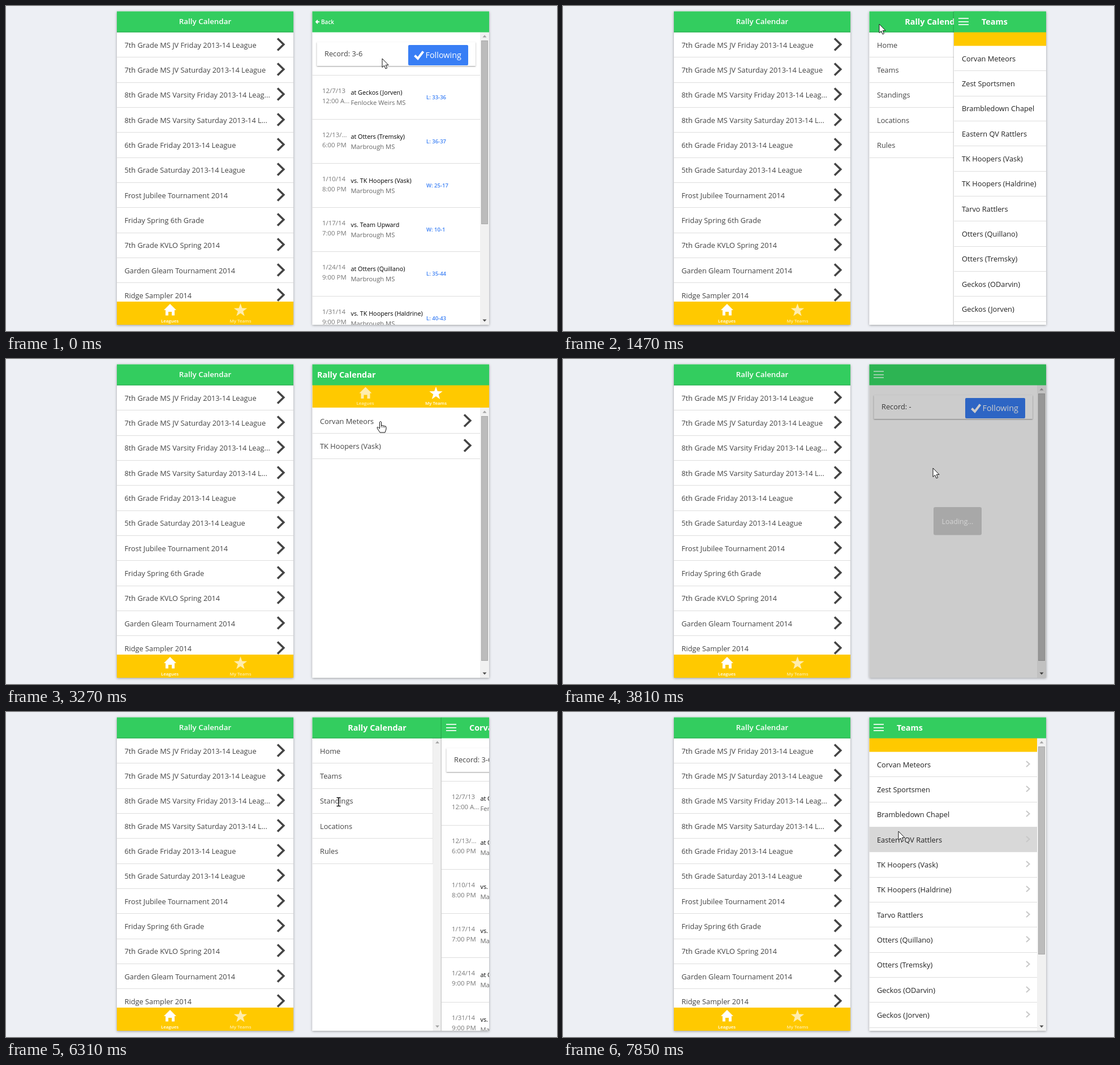
An HTML page that plays this animation: 974x575 px, repeating every 8 s.

```html
<!DOCTYPE html>
<html lang="en">
<head>
<meta charset="utf-8">
<title>League schedule app</title>
<style>
  html, body { margin: 0; width: 100%; height: 100%; overflow: hidden; background: #edeff4; }
  svg { display: block; position: absolute; left: 0; top: 0; }
  text { font-family: "Open Sans", "Noto Sans", sans-serif; font-size: 12.8px; fill: #444; }
  .panel { fill: #fff; filter: drop-shadow(0 1px 2px rgba(0, 0, 0, .35)); }
  .title { font-size: 14.4px; font-weight: 700; fill: #fff; }
  .tab { font-size: 7.9px; font-weight: 600; fill: #fff; text-anchor: middle; }
  .date { font-size: 11.4px; fill: #777; }
  .rival { font-size: 10.8px; fill: #000; }
  .place { font-size: 11.2px; fill: #666; }
  .score { font-size: 9.5px; font-weight: 600; fill: #387ef5; }
</style>
</head>
<body>
<svg id="stage" width="974" height="575" viewBox="0 0 974 575"></svg>
<script>
const GREEN = '#33cd5f', YELLOW = '#ffc900', BLUE = '#387ef5', LINE = '#ddd';
const PITCH = 44.34, LOOP = 8000, PAGE_W = 313;

const leagues = [
  '7th Grade MS JV Friday 2013-14 League', '7th Grade MS JV Saturday 2013-14 League',
  '8th Grade MS Varsity Friday 2013-14 League', '8th Grade MS Varsity Saturday 2013-14 League',
  '6th Grade Friday 2013-14 League', '5th Grade Saturday 2013-14 League',
  'Frost Jubilee Tournament 2014', 'Friday Spring 6th Grade', '7th Grade KVLO Spring 2014',
  'Garden Gleam Tournament 2014', 'Ridge Sampler 2014'
];
const teams = [
  'Corvan Meteors', 'Zest Sportsmen', 'Brambledown Chapel', 'Eastern QV Rattlers',
  'TK Hoopers (Vask)', 'TK Hoopers (Haldrine)', 'Tarvo Rattlers', 'Otters (Quillano)',
  'Otters (Tremsky)', 'Geckos (ODarvin)', 'Geckos (Jorven)'
];
const games = [
  ['12/7/13', '12:00 A...', 'at Geckos (Jorven)', 'Fenlocke Weirs MS', 'L: 33-36'],
  ['12/13/...', '6:00 PM', 'at Otters (Tremsky)', 'Marbrough MS', 'L: 36-37'],
  ['1/10/14', '8:00 PM', 'vs. TK Hoopers (Vask)', 'Marbrough MS', 'W: 25-17'],
  ['1/17/14', '7:00 PM', 'vs. Team Upward', 'Marbrough MS', 'W: 10-1'],
  ['1/24/14', '9:00 PM', 'at Otters (Quillano)', 'Marbrough MS', 'L: 35-44'],
  ['1/31/14', '9:00 PM', 'vs. TK Hoopers (Haldrine)', 'Marbrough MS', 'L: 40-43']
];
const appName = 'Rally Calendar';

// Drawing helpers, all returning SVG markup
const rect = (x, y, w, h, fill, more = '') =>
  `<rect x="${x}" y="${y}" width="${w}" height="${h}" fill="${fill}" ${more}/>`;
const text = (x, y, s, cls = '', more = '') => `<text x="${x}" y="${y}" class="${cls}" ${more}>${s}</text>`;
const path = (d, more) => `<path d="${d}" ${more}/>`;
const group = (id, body, more = '') => `<g id="${id}" ${more}>${body}</g>`;
const stroke = (color, w) => `fill="none" stroke="${color}" stroke-width="${w}"`;
const shorten = (list, cuts) => list.map((s, i) => cuts[i] ? s.slice(0, -cuts[i]) + '...' : s);

const bigArrow = (x, y) => path(`M${x} ${y - 10.5}l10.8 10.5l-10.8 10.5`, stroke('#444', 3.6));
const smallArrow = (x, y) => path(`M${x} ${y - 5}l5.5 5l-5.5 5`, stroke('#c8c8c8', 2));

function rows(names, left, right, top, arrow, color = '#444') {
  return names.map((name, i) => {
    const y = top + Math.floor(PITCH * i);
    return rect(left, Math.round(top + PITCH * (i + 1)), right - left, 1, LINE) +
      text(left + 13.5, y + 28, name, '', `style="fill:${color}"`) +
      (arrow ? arrow(y + 22) : '');
  }).join('');
}

function scrollbar(x, top, thumbEnd) {
  const thumb = thumbEnd
    ? rect(x + 2.5, top + 15.5, 11, thumbEnd - top - 16, '#bcbcbc', 'stroke="#a8a8a8"') : '';
  const down = thumbEnd ? '#505050' : '#a3a3a3';
  return rect(x, top, 16, 564 - top, '#f1f1f1') + thumb +
    path(`M${x + 4.5} ${top + 9.5}h7l-3.5 -4z`, 'fill="#a3a3a3"') +
    path(`M${x + 4.5} 554.5h7l-3.5 4z`, `fill="${down}"`);
}

function star(cx, cy, r) {
  const pts = Array.from({ length: 10 }, (_, i) => {
    const a = Math.PI * (i / 5 - .5), d = i % 2 ? r * .4 : r;
    return `${(cx + d * Math.cos(a)).toFixed(2)},${(cy + d * Math.sin(a)).toFixed(2)}`;
  });
  return `<polygon points="${pts.join(' ')}" fill="#fff"/>`;
}

function tabs(active, width, height, labelY) {
  const fade = i => `opacity="${i === active ? 1 : .68}"`;
  return rect(196, 523, width, height, YELLOW) +
    `<g ${fade(0)}>` +
    path('M290 527L301 538H298V547.5H293V541H287V547.5H282V538H279Z', 'fill="#fff"') +
    text(289.5, labelY, 'Leagues', 'tab') + `</g><g ${fade(1)}>` +
    star(414.5, 538.6, 12.3) + text(414.5, labelY, 'My Teams', 'tab') + '</g>';
}
const topTabs = active => `<g transform="translate(345.5 -477.5)">${tabs(active, 313, 40.5, 558.5)}</g>`;

const burger = [21, 27, 32].map(y => rect(549, y, 18, 1.7, '#fff')).join('');
const header = (x, w) => rect(x, 9.5, w, 37, GREEN);
const darkEdge = (x, w) => rect(x, 45.5, w, 1, '#28a54c');
const paper = rect(541, 46, PAGE_W, 518, '#fff');

function detail() {
  const list = games.map(([day, hour, rival, place, score], i) => {
    const y = Math.round(78.1 * i);
    return rect(541, 122 + y, 297, 1, LINE) +
      text(559, 154 + y, day, 'date') + text(559, 172 + y, hour, 'date') +
      text(609.5, 157 + y, rival, 'rival') + text(609.5, 175 + y, place, 'place') +
      text(743, 165 + y, score, 'score');
  }).join('');
  return paper +
    rect(549.5, 64, 280.5, 42, '#fff', 'style="filter:drop-shadow(0 1px 1.2px rgba(0,0,0,.4))"') +
    rect(711, 69, 106, 36, BLUE, 'rx="2"') +
    path('M722.5 87.5l5.5 5.5l9.5 -12.5', stroke('#fff', 4)) +
    text(741.5, 92, 'Following', '', 'style="font-size:14.4px;fill:#fff"') +
    group('loaded', text(563, 89, 'Record: 3-6') + list + scrollbar(838, 46, 386)) +
    group('blank', text(563, 89, 'Record: -') + scrollbar(838, 46, 534));
}

const pages = {
  home: paper + rows(shorten(leagues, { 1: 3, 2: 5, 3: 7 }), 541.5, 838, 87, y => bigArrow(810, y)) +
    scrollbar(838, 86, 240) + topTabs(0),
  mine: paper + rows([teams[0], teams[4]], 541.5, 838, 87, y => bigArrow(810, y)) +
    scrollbar(838, 86, 534) + topTabs(1),
  teams: paper + rect(541, 46, 297, 24.5, YELLOW) + rect(541, 203, 297, 44, '#d8d8d8', 'id="hover"') +
    rows(teams, 541.5, 838, 70, y => smallArrow(819, y), '#222') + scrollbar(838, 46, 429),
  detail: detail()
};
const heads = {
  back: path('M554 28h-6m3 -3l-3 3l3 3', stroke('#fff', 1.8)) +
    text(557, 32, 'Back', '', 'style="font-size:10px;font-weight:600;fill:#fff"'),
  home: text(550, 33, appName, 'title'),
  teams: burger + text(590, 33, 'Teams', 'title'),
  wait: `<g opacity=".7">${burger}</g>`,
  team: burger + text(590, 33, teams[0], 'title')
};
const cursors = {
  arrow: path('M0 0V15.5L3.6 12.3L6 18L8.6 16.9L6.2 11.4H11Z', 'fill="#fff" stroke="#111"'),
  hand: path('M-1.5 1.5Q0 -1 1.5 1.5V8Q3 6.5 4.5 8.3Q6 7 7.3 9Q9.5 8 10 10.5V14L8 20H-1L-5.5 13Q-7 10 -4.5 10.5L-1.5 13Z',
    'fill="#fff" stroke="#111"') + path('M1.5 8v3M4.5 8.5v3M7.3 9.2v2.5', stroke('#111', .8)),
  beam: path('M-3.5 -7.5H-1Q0 -7.5 0 -6.5Q0 -7.5 1 -7.5H3.5M0 -7V7M-3.5 7.5H-1Q0 7.5 0 6.5Q0 7.5 1 7.5H3.5', stroke('#111', 1.4))
};
const each = (prefix, set) => Object.entries(set).map(([k, v]) => group(`${prefix}-${k}`, v)).join('');

const stage = document.getElementById('stage');
stage.innerHTML =
  '<clipPath id="left"><rect x="196" y="46" width="312" height="478"/></clipPath>' +
  '<clipPath id="right"><rect x="541.5" y="9" width="312.5" height="555"/></clipPath>' +
  rect(196, 9.5, 312, 554.5, '#fff', 'class="panel"') + rect(541.5, 9.5, 312.5, 554.5, '#fff', 'class="panel"') +
  `<g clip-path="url(#left)">${rows(shorten(leagues, { 2: 2, 3: 5 }), 196, 508, 46, y => bigArrow(480, y))}</g>` +
  header(196, 312) + darkEdge(196, 312) +
  text(352, 32, appName, '', 'text-anchor="middle" style="font-size:13.4px;font-weight:600;fill:#fff"') +
  tabs(0, 312, 41, 560) +
  '<g clip-path="url(#right)">' +
  group('menu', rect(541, 9.5, 229, 555, '#fff') +
    rows(['Home', 'Teams', 'Standings', 'Locations', 'Rules'], 541.5, 755, 46) +
    rect(754, 46, 1, 222, LINE) + scrollbar(754.5, 46) +
    header(541, 229) + darkEdge(541, 229) +
    text(656, 33, appName, 'title', 'text-anchor="middle"')) +
  group('front', rect(539.5, 9.5, 2, 555, 'rgba(0,0,0,.15)') +
    each('page', pages) + header(541, PAGE_W) + each('head', heads)) +
  group('dim', rect(541, 9.5, PAGE_W, 37, 'rgba(0,0,0,.12)') + rect(541, 46.5, PAGE_W, 517.5, 'rgba(0,0,0,.2)')) +
  rect(655, 262, 85, 49.5, 'rgba(0,0,0,.7)', 'id="box" rx="3"') +
  text(697.5, 292, 'Loading...', '', 'id="note" text-anchor="middle" style="font-size:12.4px;fill:#fff"') +
  '</g>' + group('cursor', each('cur', cursors));

// Timeline
const ticks = [
  0, 150, 280, 400, 530, 660, 780, 930, 1080, 1200, 1350, 1470, 1620, 1740, 1890, 2010, 2160,
  2310, 2460, 2580, 2730, 2850, 3000, 3120, 3270, 3420, 3540, 3690, 3810, 3930, 4060, 4180, 4310, 4440,
  4570, 4720, 4840, 4990, 5140, 5260, 5400, 5540, 5680, 5800, 5940, 6060, 6190, 6310, 6460, 6610,
  6760, 6880, 7030, 7150, 7290, 7420, 7560, 7700, 7850
];
const pageSteps = [[0, 'detail'], [530, 'teams'], [1740, 'home'], [2460, 'mine'], [3540, 'detail'], [6880, 'teams']];
const headSteps = [[0, 'back'], [530, 'teams'], [1740, 'home'], [3540, 'wait'], [4310, 'team'], [6880, 'teams']];
const cursorSteps = [
  [0, 'arrow', 665, 93], [400, 'hand', 565, 27], [660, 'arrow', 570, 45], [780, 'arrow', 579, 65],
  [930, 'arrow', 575, 58], [1080, 'hand', 558, 30], [1470, 'arrow', 559, 32], [1740, 'beam', 586, 70],
  [1890, 'arrow', 592, 72], [2160, 'hand', 700, 82], [2460, 'hand', 757, 66], [2730, 'hand', 757, 66],
  [3270, 'hand', 662, 110], [3540, 'hand', 662, 110], [3690, 'arrow', 656, 160], [3810, 'arrow', 654, 193],
  [4310, 'arrow', 642, 180], [4840, 'hand', 557, 32], [4990, 'hand', 556, 32], [5140, 'hand', 556, 32],
  [5260, 'arrow', 562, 38], [5540, 'beam', 588, 62], [5800, 'arrow', 588, 88], [6060, 'beam', 588, 113],
  [6190, 'arrow', 588, 136], [6310, 'beam', 588, 159], [6460, 'arrow', 589, 132], [6610, 'beam', 590, 113],
  [7030, 'arrow', 590, 113], [7290, 'arrow', 590, 130], [7700, 'arrow', 593, 211]
];
const slideTrack = [[400, 0], [530, .62], [660, .92], [780, .995], [930, 1]];
const menuTrack = [
  [1350, 0], [1470, 150], [1620, 229], [1740, 229], [1890, 60], [2010, 0],
  [5140, 0], [5260, 140], [5400, 222], [5540, 229], [6760, 229], [6880, 120], [7030, 10], [7150, 0]
];
const dimTrack = [[3540, 0], [3690, .6], [3810, 1], [4180, 1], [4310, 0], [6880, 0], [7030, 1], [7290, 1], [7420, 0]];
const boxTrack = [[3690, 0], [3810, .25], [3930, 1], [4180, 1], [4310, 0], [6880, 0], [7030, .25], [7150, 1], [7290, 1], [7420, 0]];

const step = (list, t) => list.findLast(s => s[0] <= t);
function track(list, t, col = 1) {
  const i = list.findLastIndex(s => s[0] <= t);
  if (i < 0) return list[0][col];
  const a = list[i], b = list[i + 1];
  return b ? a[col] + (b[col] - a[col]) * (t - a[0]) / (b[0] - a[0]) : a[col];
}

const get = id => document.getElementById(id);
const show = (id, on) => { get(id).style.display = on ? '' : 'none'; };
const move = (id, x, y = 0) => get(id).setAttribute('transform', `translate(${x} ${y})`);

function render(t) {
  const page = step(pageSteps, t)[1], head = step(headSteps, t)[1];
  const slide = track(slideTrack, t), sliding = slide > 0 && slide < 1;
  for (const k in pages) show('page-' + k, k === page || (sliding && k === 'detail'));
  for (const k in heads) show('head-' + k, k === head);
  move('page-teams', sliding ? PAGE_W * (slide - 1) : 0);
  move('page-detail', sliding ? PAGE_W * slide : 0);

  const waiting = t >= 3540 && t < 4310;
  show('loaded', !waiting);
  show('blank', waiting);
  show('hover', t >= 7850);

  const open = track(menuTrack, t);
  show('menu', open > 0);
  move('front', open);

  const box = track(boxTrack, t);
  get('dim').style.opacity = track(dimTrack, t);
  get('box').style.opacity = box;
  get('note').style.opacity = Math.sqrt(box);

  const kind = step(cursorSteps, t)[1];
  for (const k in cursors) show('cur-' + k, k === kind);
  move('cursor', track(cursorSteps, t, 2), track(cursorSteps, t, 3));
}

const start = performance.now();
let last = -1;
function loop() {
  const t = (performance.now() - start) % LOOP;
  const tick = ticks.findLast(v => v <= t);
  if (tick !== last) render(last = tick);
  requestAnimationFrame(loop);
}
loop();
</script>
</body>
</html>
```
